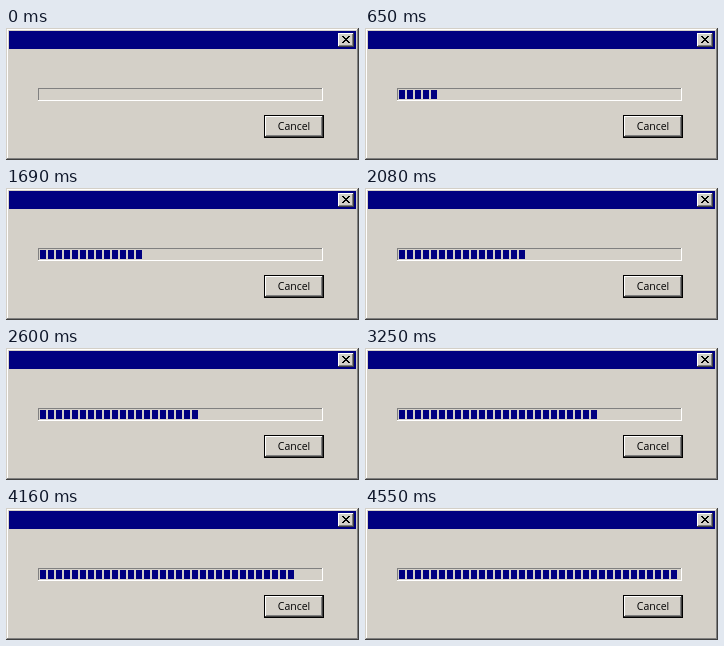
An HTML page for the animation above (4810 ms loop, 353x132 px).

```html
<!DOCTYPE html>
<html lang="en">
<head>
<meta charset="utf-8">
<title>Progress dialog</title>
<style>
  html, body { margin: 0; width: 353px; height: 132px; overflow: hidden; }
  div, svg { position: absolute; box-sizing: border-box; }
  .dialog {
    width: 353px; height: 132px; background: #d4d0c8;
    box-shadow: inset -1px -1px #404040, inset 1px 1px #d4d0c8,
                inset -2px -2px #808080, inset 2px 2px #fff;
  }
  .title { left: 3px; top: 3px; width: 347px; height: 18px; background: #000080; }
  .raised {
    background: #d4d0c8;
    box-shadow: inset -1px -1px #404040, inset 1px 1px #fff, inset -2px -2px #808080;
  }
  .close { left: 332px; top: 5px; width: 16px; height: 14px; }
  .close svg { left: 4px; top: 3px; }
  .track {
    left: 32px; top: 60px; width: 285px; height: 13px;
    box-shadow: inset -1px -1px #fff, inset 1px 1px #808080;
  }
  #bar {
    left: 2px; top: 2px; height: 9px;
    background: repeating-linear-gradient(90deg, #000080 0 6px, transparent 6px 8px);
  }
  .outline { left: 258px; top: 87px; width: 60px; height: 23px; background: #000; }
  .cancel {
    left: 1px; top: 1px; width: 58px; height: 21px;
    font: 10.5px/20px "Open Sans", "Noto Sans", sans-serif; text-align: center; color: #000;
  }
</style>
</head>
<body>
<div class="dialog">
  <div class="title"></div>
  <div class="raised close">
    <svg width="8" height="7" shape-rendering="crispEdges"><path id="cross"/></svg>
  </div>
  <div class="track"><div id="bar"></div></div>
  <div class="outline"><div class="raised cancel">Cancel</div></div>
</div>
<script>
  const STEP = 130, BLOCKS = 35, PITCH = 8, LOOP = 4810;
  const bar = document.getElementById('bar');

  // Stepped two-pixel-wide diagonals of the close button
  const dash = (x, y) => `M${x} ${y}h2v1h-2z`;
  document.getElementById('cross').setAttribute('d',
    [0, 1, 2, 3, 4, 5, 6].map(i => dash(i, i) + dash(6 - i, i)).join(''));

  const start = performance.now();
  function draw() {
    const time = (performance.now() - start) % LOOP;
    const count = Math.min(BLOCKS, Math.floor(time / STEP));
    bar.style.width = count * PITCH + 'px';
    requestAnimationFrame(draw);
  }
  draw();
</script>
</body>
</html>
```
